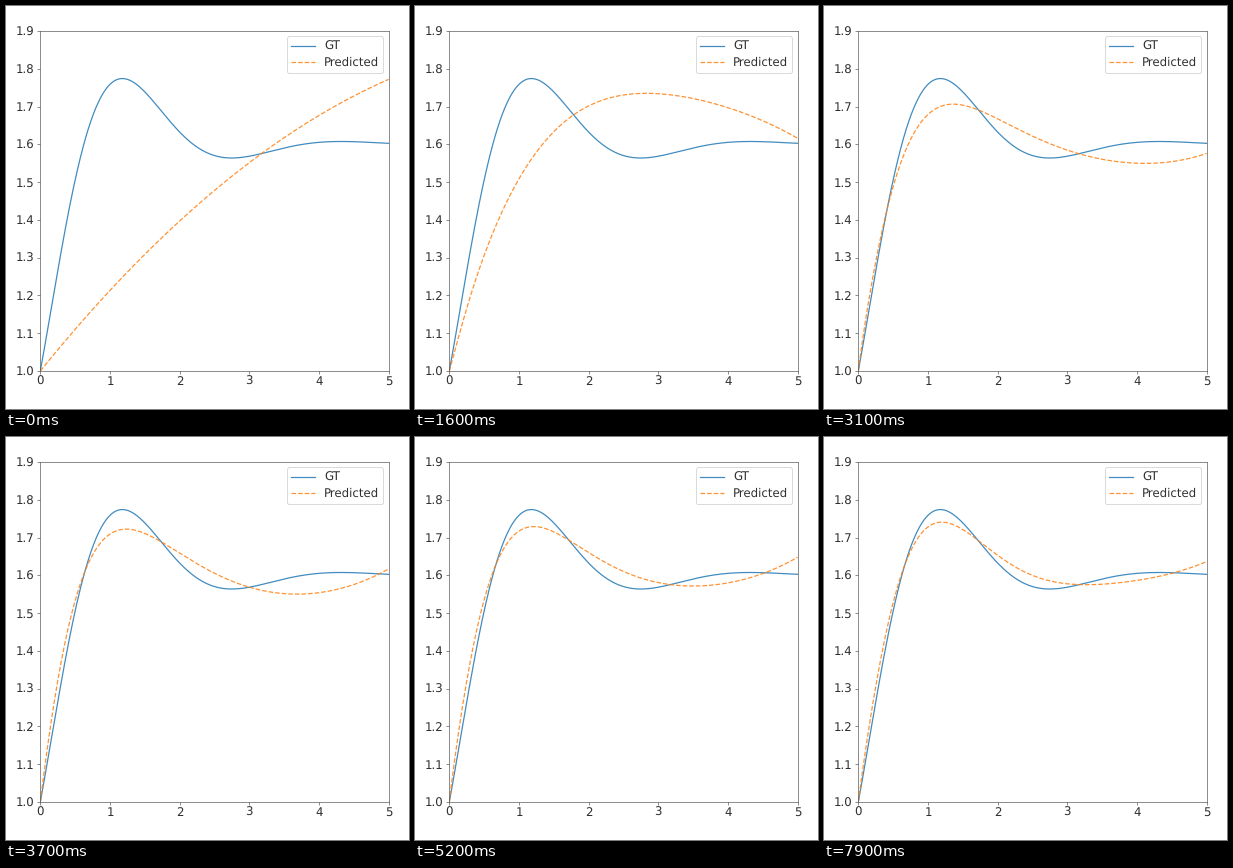
A matplotlib script that plays this animation: 403x403 px, repeating every 8 s.

```python
import numpy as np
import matplotlib.pyplot as plt
from matplotlib.animation import FuncAnimation

SIZE, DPI = 403, 64
FRAMES, INTERVAL = 80, 100
INK, EDGE = "#303030", "#555555"

plt.rcParams.update({
    "font.family": "DejaVu Sans", "font.size": 13.2, "text.color": INK,
    "text.hinting": "none",
    "lines.linewidth": 1.4, "axes.linewidth": 0.75, "axes.edgecolor": EDGE,
    "xtick.major.size": 3.3, "ytick.major.size": 3.3,
    "xtick.major.pad": 2.1, "ytick.major.pad": 3.3,
    "xtick.major.width": 0.75, "ytick.major.width": 0.75,
    "xtick.color": EDGE, "ytick.color": EDGE,
    "xtick.labelcolor": INK, "ytick.labelcolor": INK,
})

t = np.linspace(0, 5, 400)
truth = 1.6 + np.exp(-t) * (0.2 * np.sin(2 * t) - 0.6 * np.cos(2 * t))


def through(*values):
    """Smooth curve from 1 at t = 0 through a few key heights."""
    knots = np.log1p([0, .2, .6, 1.1, 1.8, 2.8, 4, 5])
    coeffs = np.polyfit(knots, (1, *values), len(values))
    return np.polyval(coeffs, np.log1p(t))


# Stages of training: the fit bends, overshoots, then creeps to the truth
start = 1 + 0.2279 * t - 0.0147 * t**2
hump = through(1.134, 1.354, 1.539, 1.680, 1.735, 1.697, 1.616)
dip = through(1.240, 1.546, 1.693, 1.685, 1.598, 1.550, 1.576)
sharp = through(1.277, 1.613, 1.7285, 1.679, 1.579, 1.572, 1.657)
settled = through(1.265, 1.595, 1.726, 1.6835, 1.590, 1.580, 1.648)
final = settled + 0.26 * (truth - settled)

times = np.array([0, 1600, 3100, 4300, 5200, 7900])
curves = np.array([start, hump, dip, sharp, settled, final])
slopes = np.gradient(curves, times, axis=0)


def predicted(ms):
    """Cubic Hermite blend between neighbouring stages."""
    i = np.searchsorted(times[1:-1], ms, side="right")
    span = times[i + 1] - times[i]
    u = (ms - times[i]) / span
    h = u * u * (3 - 2 * u)
    bend = (1 - u) * slopes[i] - u * slopes[i + 1]
    return (1 - h) * curves[i] + h * curves[i + 1] + span * u * (1 - u) * bend


fig = plt.figure(figsize=(SIZE / DPI, SIZE / DPI), dpi=DPI, facecolor="white")
left, right, top, bottom = 34.3, 382.6, 25, 365
ax = fig.add_axes([left / SIZE, 1 - bottom / SIZE,
                   (right - left) / SIZE, (bottom - top) / SIZE])
ax.set(xlim=(0, 5), ylim=(1, 1.9), xticks=range(6),
       yticks=np.linspace(1, 1.9, 10))
ax.yaxis.set_major_formatter("{x:.1f}")

ax.plot(t, truth, color="C0", alpha=0.85, label="GT")
fit, = ax.plot(t, predicted(0), "--", color="C1", alpha=0.85, label="Predicted")
ax.legend(loc="upper right", borderpad=0.36, labelspacing=0.42,
          borderaxespad=0.45)


def update(frame):
    fit.set_ydata(predicted(frame * INTERVAL))
    return fit,


anim = FuncAnimation(fig, update, frames=FRAMES, interval=INTERVAL,
                     repeat=True, repeat_delay=0)
plt.show()
```
